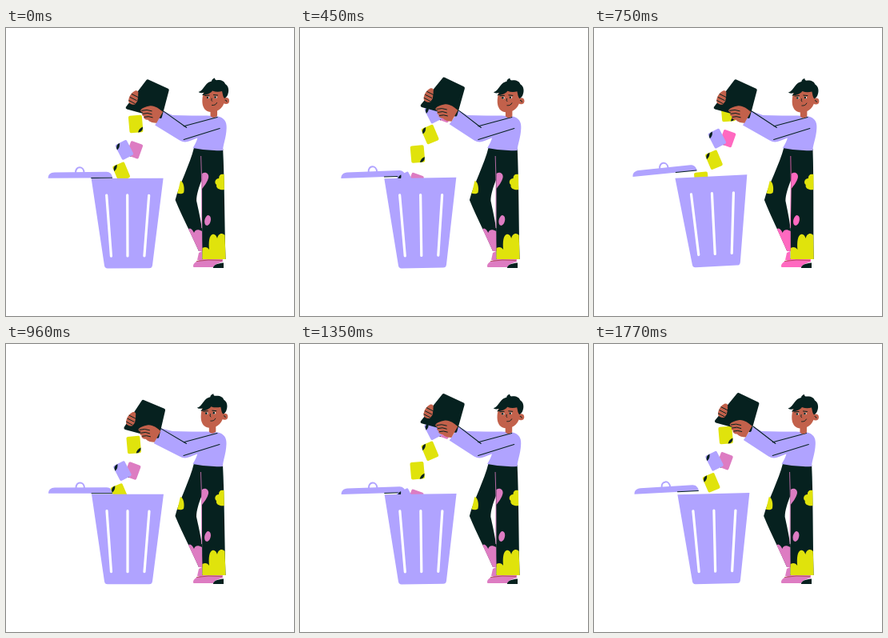
Write an HTML page that moves like this. It is 360 px wide and 360 px high and loops after 1.8 s.

```html
<!DOCTYPE html>
<html lang="en">
<head>
<meta charset="utf-8">
<title>Emptying a box</title>
<style>
  html, body { margin: 0; width: 100%; height: 100%; overflow: hidden; background: #fff; }
  svg { display: block; width: 100vw; height: 100vh; --pink: #dd7cc2; }
  .ink { fill: #06211f; }
  .lilac { fill: #b0a3ff; }
  .yellow { fill: #e0e30c; }
  .pink { fill: var(--pink); }
  .skin { fill: #c2614b; }
  .line { fill: none; stroke: #06211f; stroke-width: 1; stroke-linecap: round; stroke-linejoin: round; }
</style>
</head>
<body>
<svg viewBox="0 0 360 360">
  <!-- lid -->
  <g id="lid">
    <path d="M87.5 181C87 172 98 172 98 181" fill="none" stroke="#b0a3ff" stroke-width="2"/>
    <path class="lilac" d="M53 187.5C53 183 56 180.5 61 180.3L126 180C130 180 133 183 133.5 187.5Z"/>
    <path class="line" d="M107 187.5H133" stroke-width=".8"/>
  </g>

  <g id="papers"></g>

  <!-- bin -->
  <g id="bin">
    <path class="lilac" d="M107 188H197L183 297Q182.500 300.500 179 300.500H127Q123.500 300.500 123 297Z"/>
    <path d="M126 209L131.500 285M152 209V285M179 209.500L173 285" stroke="#fff" stroke-width="3.2" stroke-linecap="round"/>
  </g>

  <!-- shoes -->
  <path class="pink" d="M241 281L245 279V290H239ZM234 297C235 292 241 291 246 288L271 289V292C267 294 262 294 259 299H235Q233.500 299 234 297Z"/>
  <path class="ink" d="M259 299C260 296 265 294 272 293.500V300H259Z"/>
  <path d="M238 291.500Q252 289 270 290.500" fill="none" stroke="#a8403f" stroke-width=".8"/>

  <g id="body">
    <!-- trousers -->
    <path class="ink" d="M235 149L271 151C273 190 273 240 274.500 289H245.500L244.500 190C241 199 238 208 238 216C240 225 243 238 245 251L245.500 279H241C232 258 221 238 211.500 215C216 197 230 170 235 149Z"/>
    <path d="M243.500 160L244.500 190V250" fill="none" stroke="var(--pink)" stroke-width=".8"/>
    <path class="yellow" d="M214 206.500C216 201 217 194 218 191C222 192 223.500 201 222 206C219 208 216 207 214 206.500Z"/>
    <path class="pink" d="M245 182C249 179 254 182 253 187C252 192 248 197 245 201Z"/>
    <path class="yellow" d="M272.500 183C268 182 266 184 266 188C261 188 260 194 263 196C262 201 268 203 272.800 202Z"/>
    <ellipse class="pink" cx="252" cy="240.500" rx="3.800" ry="6.500" transform="rotate(12 252 240.500)"/>
    <path class="pink" d="M228 251.500C230 249 233 252 235 256C236 252 240 251 245 254L245.500 279H241Z"/>
    <path class="yellow" d="M245.500 289V275C249 273 252 274 254 277C253 268 254 259 258 258C261 257 263 260 264 263C265 257 270 255 273.500 259L274.500 289Z"/>

    <!-- shirt and arms -->
    <path class="lilac" d="M251 109.500L265 110.500C272 112 276 117 275.500 125C275 138 271 146 271 153Q252 154 233.500 150C236 145 239 141 239.500 135L230 110Z"/>
    <path class="lilac" id="backArm"/>
    <path class="lilac" id="frontArm"/>
    <path class="line" id="creases"/>
  </g>

  <!-- head -->
  <g id="head">
    <path class="skin" d="M255.500 100H264V110Q259 114 255.500 110Z"/>
    <circle class="skin" cx="275" cy="91" r="4"/>
    <path class="skin" d="M247 80C243.500 93 245 104 256 105C266 105.500 273 98 274 88L270 76Z"/>
    <path class="ink" d="M240.500 80C244 79 246 76 249 72C251 69 254 67 257 66.500C257 64.500 259 63 261 62.500C261 64.500 262 65.500 265 65C270 65 273 67 274 70C278 72 279 78 277.500 82C277 85 275 87 273 88C271 86 271 83 270 79C266 80 262 80 258 78.500C255 82.500 249 84 245 84L248 80.500C245 81.500 243 81.500 240.500 80Z"/>
    <g class="line">
      <path d="M248.500 84.500L254 84M259.500 83.500L264.500 84"/>
      <path d="M257 88Q256 91 257.500 91.500M257.500 96.500Q262 97 263.500 93.500M274 90Q276 90 276 92" stroke-width=".9"/>
    </g>
    <ellipse cx="252.500" cy="87" rx="1.700" ry="1.300" fill="#fff"/>
    <ellipse cx="262" cy="86.500" rx="1.800" ry="1.300" fill="#fff"/>
    <circle class="ink" cx="252" cy="87" r="1.300"/>
    <circle class="ink" cx="261.500" cy="86.500" r="1.300"/>
  </g>

  <!-- box and hands -->
  <path class="ink" id="box" stroke="#06211f" stroke-width="4" stroke-linejoin="round"/>
  <g id="leftHand">
    <path class="skin" d="M161 79C164 78 166 80 165 83L165 86L164 92L161 96C158 97 153 95 153 92C153 86 157 81 161 79Z"/>
    <path class="line" d="M157 83L165 87M155 87L163 91M153.500 91L161 95"/>
  </g>
  <g id="rightHand">
    <path class="skin" d="M196 105C191 101 186 97 180 97.500C174 98.500 168 101 168 103.500C168 105 170 105.500 171 106C169 108 170 110 172 110.500C171 113 174 115 177 115C180 118 184 119 188 119Z"/>
    <path class="line" d="M169.500 103.500Q176 101.500 182 104M171 107.500Q177 105.500 182 108M173 111.500Q178 110 183 112"/>
  </g>
</svg>

<script>
const $ = id => document.getElementById(id);
const STEP = 30, LOOP = 1800;
const SHAKE = 41, CYCLE = 2 * SHAKE, DROP = 106;

// [step, distance fallen]: the pour runs slightly unevenly
const FALL = [[0, 0], [15, 37], [25, 68], [32, 88], [40, 106], [51, 136], [59, 158], [60, 164]];

// Each sheet leaves the box at x, falls at slope, and is delayed within the cycle
const SHEETS = [
  { color: 'pink', x: 185.5, slope: .44, delay: 26, turn: 20, w: 16, h: 19, fold: [-1, 1] },
  { color: 'lilac', x: 171.5, slope: .42, delay: 26, turn: -27, w: 16, h: 21, fold: [-1, -1] },
  { color: 'yellow', x: 172, slope: .41, delay: 58, turn: -5, w: 17, h: 21.5, fold: [1, 1] },
  { color: 'yellow', x: 177.8, slope: .41, delay: 0, turn: -23, w: 16, h: 21, fold: [-1, -1] }
];

const sheetMarkup = ({ color, w, h, fold: [sx, sy] }) => {
  const x = sx * w / 2, y = sy * h / 2;
  return `<g><rect class="${color}" x="${-w / 2}" y="${-h / 2}" width="${w}" height="${h}" rx="2"/>
    <path class="ink" d="M${x - sx * 6.5} ${y}Q${x - sx * 5} ${y - sy * 5} ${x} ${y - sy * 6.5}Q${x} ${y} ${x - sx * 6.5} ${y}Z"/></g>`;
};
const falling = SHEETS.flatMap(s => [0, CYCLE].map(lag => ({ ...s, lag })));
$('papers').innerHTML = falling.map(sheetMarkup).join('');
const sheetNodes = [...$('papers').children];

const mix = (a, b, k) => a + (b - a) * k;
const mixAll = (a, b, k) => a.map((v, i) => mix(v, b[i], k));
const mod = (a, n) => ((a % n) + n) % n;
const wave = (t, peak) => (1 + Math.cos(2 * Math.PI * (t - peak) / SHAKE)) / 2;
const place = (id, value) => $(id).setAttribute('transform', value);
const trace = (id, d) => $(id).setAttribute('d', d);

const BOX_UP = [180.5, 63, 204.5, 74.5, 195, 108, 153, 96.5];
const BOX_DOWN = [167.5, 75.5, 194, 86, 187, 119, 148, 108.5];
const CUFF_UP = [199, 103, 187, 120], CUFF_DOWN = [190, 106, 184, 126];

function fallen(step) {
  const i = FALL.findIndex(([s]) => s > step);
  const [s0, v0] = FALL[i - 1], [s1, v1] = FALL[i];
  return mix(v0, v1, (step - s0) / (s1 - s0));
}

function draw(ms) {
  const t = fallen(Math.floor((ms % LOOP) / STEP));
  const pour = wave(t, 13.5);
  const hop = 3 * wave(t, 22);
  const lean = wave(t, 26) ** 1.5;
  const tilt = wave(t, 28) ** 2;
  const nod = wave(t, 30);
  const beat = mod(t, SHAKE);

  document.querySelector('svg').style.setProperty('--pink', beat > 20 && beat < 30 ? '#ff69c0' : '#dd7cc2');

  falling.forEach((s, i) => {
    const u = mod(t - s.delay, CYCLE) + s.lag;
    const y = 96 + u + 4 * (u / 100) ** 4;
    const node = sheetNodes[i];
    node.style.display = u < DROP ? '' : 'none';
    node.setAttribute('transform', `translate(${s.x - s.slope * u} ${y}) rotate(${s.turn})`);
  });

  place('bin', `translate(0 ${-hop}) rotate(${-2.9 * lean} 153 300)`);
  place('lid', `translate(${-4.5 * tilt} ${.5 - 3.5 * wave(t, 18)}) rotate(${-5.7 * tilt} 53 188)`);
  place('body', `translate(0 300) skewX(${-.95 * lean}) translate(0 -300)`);
  place('head', `translate(${4.6 * nod - 2} ${nod - .4})`);

  trace('box', `M${mixAll(BOX_UP, BOX_DOWN, pour).join(' ')}Z`);
  const swing = pour - .29;
  place('leftHand', `translate(${-7 * swing} ${15 * swing})`);
  place('rightHand', `translate(${-6 * swing} ${9 * swing})`);

  const [x1, y1, x2, y2] = mixAll(CUFF_UP, CUFF_DOWN, pour);
  const shift = 3.2 * lean;
  const top = `${x1 - shift} ${y1}`, low = `${x2 - shift} ${y2}`;
  trace('backArm', `M${top}L208 109L252 110L234 128L222 124Z`);
  trace('frontArm', `M${top}L225 123L262 112C272 111 274 122 266 127L230 141Q223 144 217 140.500L${low}Z`);
  trace('creases', `M${top}L225.500 124.500M222 122.800L264 111.500M222 139.500L267 125.500`);
}

function tick(now) {
  draw(now - start);
  requestAnimationFrame(tick);
}
const start = performance.now();
draw(0);
requestAnimationFrame(now => tick(Math.max(now, start)));
</script>
</body>
</html>
```
